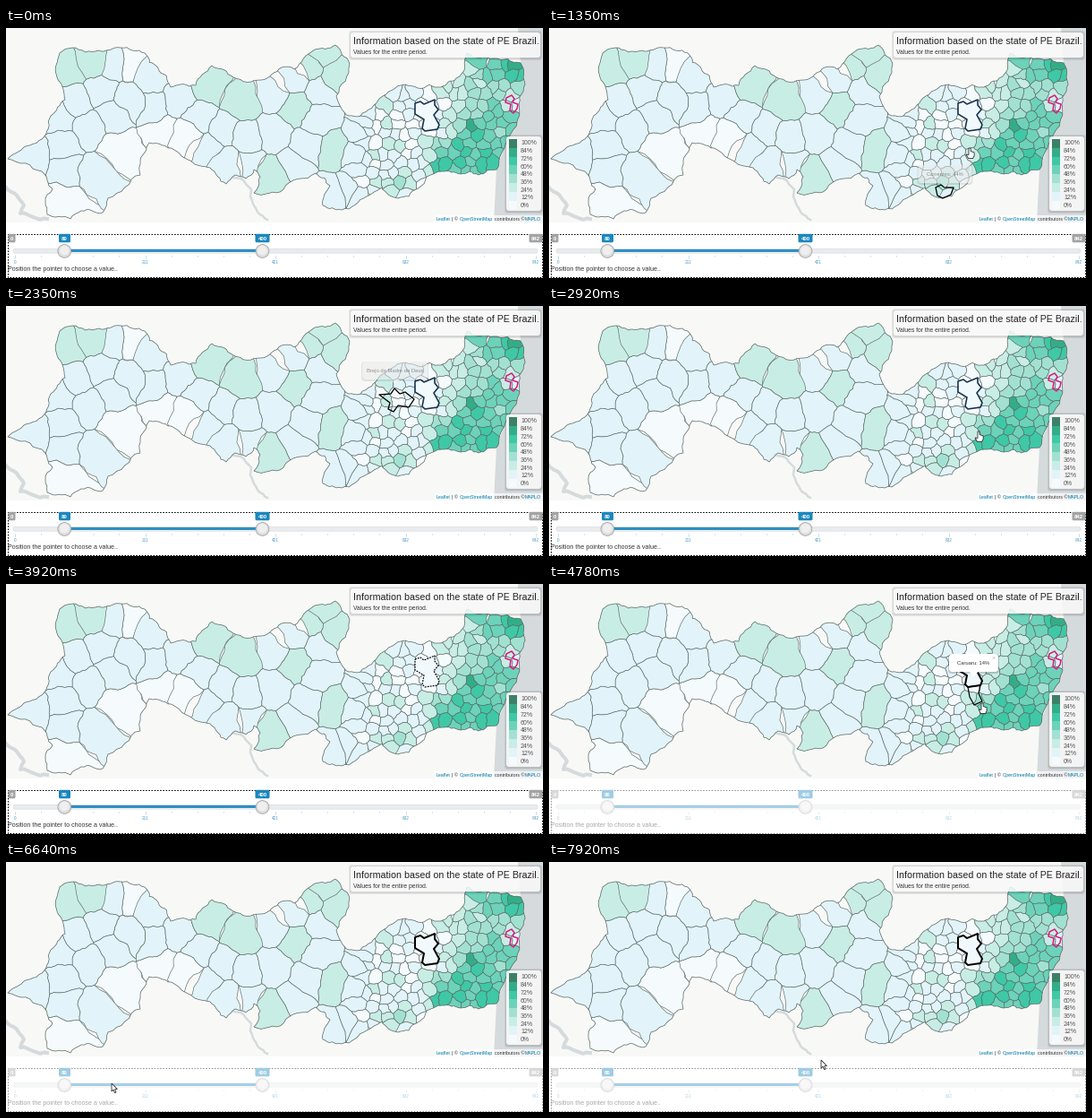
A matplotlib script that plays this animation: 600x279 px, repeating every 8 s.

```python
import math
import random

import numpy as np
import matplotlib.pyplot as plt
from matplotlib.animation import FuncAnimation
from matplotlib.collections import PolyCollection
from matplotlib.patches import Circle, FancyBboxPatch, Polygon, Rectangle
from matplotlib.path import Path

W, H, DPI = 600, 279, 64
LOOP, TICK, STEP = 8000, 40, 140
PT = 72 / DPI
RAMP = ["#f5fbfd", "#e2f4fa", "#c8ede5", "#a2e1d2",
        "#6dd2ba", "#3fc8a6", "#33ad88", "#3d8068"]
WATER, LINK, BLUE, NAVY, EDGE = "#d5dadc", "#0078a8", "#1b87bd", "#16324f", "#56635f"

fig = plt.figure(figsize=(W / DPI, H / DPI), dpi=DPI, facecolor="white")
ax = fig.add_axes([0, 0, 1, 1])
ax.set_xlim(0, W)
ax.set_ylim(H, 0)
ax.axis("off")


# ---- helpers ----
def label(x, y, text, size, color="#333333", z=7, **kw):
    return ax.text(x, y, text, fontsize=size * PT, color=color, zorder=z,
                   family="Liberation Sans", **kw)


def rect(x0, y0, x1, y1, color, z=1, **kw):
    return ax.add_patch(Rectangle((x0, y0), x1 - x0, y1 - y0, fc=color, lw=0, zorder=z, **kw))


def rounded(x0, y0, x1, y1, color, r=2, z=1, **kw):
    kw.setdefault("lw", 0)
    style = f"round,pad=0,rounding_size={r}"
    return ax.add_patch(FancyBboxPatch((x0, y0), x1 - x0, y1 - y0, boxstyle=style,
                                       fc=color, zorder=z, **kw))


def card(x0, y0, x1, y1):
    for grow in (2, 1):
        rounded(x0 - grow, y0 - grow, x1 + grow, y1 + grow + 1, "black", 3, 6, alpha=.07)
    rounded(x0, y0, x1, y1, "white", 3, 6, alpha=.85)


def split(a, b, depth=3):
    """Points from a up to b, bent the same way from either direction."""
    lo, hi = sorted((a, b))
    dx, dy = hi[0] - lo[0], hi[1] - lo[1]
    if depth == 0 or math.hypot(dx, dy) < 5:
        return [a]
    bend = (math.sin(lo[0] * 13 + lo[1] * 78 + hi[0] * 38 + hi[1] * 4) * 4375 % 1 - .5) * .28
    mid = ((lo[0] + hi[0]) / 2 - dy * bend, (lo[1] + hi[1]) / 2 + dx * bend)
    return split(a, mid, depth - 1) + split(mid, b, depth - 1)


def rough(points):
    return [p for a, b in zip(points, points[1:] + points[:1]) for p in split(a, b)]


def half_plane(poly, seed, other):
    """Keep the part of poly that is nearer to seed than to other."""
    nx, ny = other[0] - seed[0], other[1] - seed[1]
    limit = (nx * (other[0] + seed[0]) + ny * (other[1] + seed[1])) / 2
    out = []
    for p, q in zip(poly, poly[1:] + poly[:1]):
        dp, dq = (limit - nx * v[0] - ny * v[1] for v in (p, q))
        if dp >= 0:
            out.append(p)
        if dp * dq < 0:
            s = dp / (dp - dq)
            out.append((p[0] + s * (q[0] - p[0]), p[1] + s * (q[1] - p[1])))
    return out


def cell(seed, seeds, reach=45):
    x, y = seed
    poly = [(x + reach * i, y + reach * j) for i, j in ((-1, -1), (1, -1), (1, 1), (-1, 1))]
    for other in seeds:
        if other != seed and math.dist(seed, other) < 3 * reach:
            poly = half_plane(poly, seed, other)
    return [(round(px, 1), round(py, 1)) for px, py in poly]


# ---- state outline ----
NORTH = [(60, 28), (74, 22), (104, 25), (128, 22), (155, 28), (170, 45), (184, 66), (212, 64),
         (230, 42), (254, 55), (285, 58), (308, 44), (322, 46), (345, 24), (368, 19), (384, 40),
         (369, 76), (383, 98), (396, 98), (418, 78), (446, 63), (460, 67), (486, 66), (503, 56),
         (515, 28), (545, 34)]
COAST = [(575, 39), (578, 55), (573, 85), (558, 130), (548, 158)]
SOUTH = [(528, 164), (518, 160), (508, 163), (487, 160), (470, 166), (450, 188), (438, 190),
         (420, 178), (403, 188), (375, 203), (354, 198), (362, 176), (346, 162), (310, 180),
         (277, 184), (284, 166), (277, 158), (268, 168), (256, 164), (246, 174), (228, 156),
         (188, 136), (160, 128), (150, 148), (150, 164), (114, 190), (108, 206), (84, 204),
         (72, 213), (46, 208), (44, 194), (52, 180), (40, 160), (2, 146)]
WEST = [(14, 138), (40, 124), (50, 98), (66, 80), (57, 55)]
state = Path(rough(NORTH + COAST + SOUTH + WEST))

# ---- base map ----
rect(0, 0, W, 217, "#f8f9f7", 0)
ax.add_patch(Polygon([(572, 0)] + COAST + [(545, 217), (600, 217), (600, 0)], fc=WATER, lw=0, zorder=0))
for river, width in (([(240, 166), (262, 168), (274, 180), (276, 196), (292, 214)], 2.5),
                     ([(0, 178), (20, 198), (16, 207), (46, 213)], 4)):
    bends = [p for a, b in zip(river, river[1:]) for p in split(a, b)] + river[-1:]
    ax.plot(*np.array(bends).T, color=WATER, lw=width * PT, zorder=0)

# Centres of the wide western municipalities by shade
PALE = [(125, 134), (70, 195), (142, 40), (176, 116), (204, 118)]
LIGHT = [(119, 40), (106, 70), (78, 82), (60, 104), (118, 98), (138, 80), (92, 112), (162, 58),
         (164, 86), (192, 80), (215, 102), (28, 138), (64, 130), (68, 160), (100, 164),
         (228, 134), (248, 148), (244, 116), (268, 124), (270, 150), (300, 72), (298, 118),
         (322, 154), (338, 132), (350, 102), (352, 70), (322, 56), (360, 186), (386, 180)]
TEAL = [(73, 45), (97, 38), (228, 64), (264, 82), (324, 88), (340, 42), (358, 30), (368, 50),
        (366, 136), (293, 164)]

# x, y, strength, radius of places with higher or lower values
HOTSPOTS = [(520, 113, 3.4, 8), (490, 147, 3, 12), (532, 151, 2, 16), (566, 46, 2, 11),
            (443, 177, 2.4, 9), (506, 134, 1.2, 18), (551, 95, 1.6, 8), (567, 85, -1.5, 7),
            (471, 98, -2, 12)]


def level(x, y, noise):
    v = .9 + 2.3 * min(max((x - 468) / 70, 0), 1) + noise
    v += sum(s * math.exp(-((x - hx) ** 2 + (y - hy) ** 2) / (2 * r * r))
             for hx, hy, s, r in HOTSPOTS)
    return min(max(round(v), 0), 6)


rng = random.Random(11)
dense = [(x + 6 * (row % 2) + rng.uniform(-4.5, 4.5), y + rng.uniform(-3.5, 3.5))
         for row, y in enumerate(range(30, 200, 11)) for x in range(395, 582, 13)]
dense = [s for s in dense if state.contains_point(s)]
seeds = PALE + LIGHT + TEAL + dense
tones = [0] * len(PALE) + [1] * len(LIGHT) + [2] * len(TEAL)
tones += [level(x, y, rng.uniform(-.85, .85)) for x, y in dense]
areas = PolyCollection([rough(cell(s, seeds)) for s in seeds], fc=[RAMP[t] for t in tones],
                       ec=EDGE, lw=.6 * PT, zorder=2)
ax.add_collection(areas)
areas.set_clip_path(state, ax.transData)
ax.add_patch(Polygon(state.vertices, fill=False, ec=EDGE, lw=.7 * PT, zorder=3))


# ---- highlighted areas ----
def outline(points, color, width, fill="none"):
    return ax.add_patch(Polygon(points, fc=fill, ec=color, lw=width * PT, zorder=4,
                                joinstyle="round"))


outline([(559, 78), (565, 75), (568, 79), (566, 83), (572, 85), (571, 90), (567, 95),
         (563, 92), (564, 85), (558, 83)], "#d9177f", 1.5)
caruaru = outline([(457, 84), (463, 82), (467, 85), (479, 80), (479, 86), (483, 91), (478, 97),
                   (484, 108), (482, 113), (468, 115), (465, 112), (467, 102), (457, 96)],
                  NAVY, 1.6, "#f1f9fc")
neighbour = outline([(468, 115), (482, 113), (480, 122), (484, 131), (475, 135), (470, 126)],
                    "black", 1.2)

# ---- title, legend, attribution ----
card(385, 5, 597, 33)
label(388, 18, "Information based on the state of PE Brazil.", 10.65, "#222222")
label(388, 29.3, "Values for the entire period.", 6.7)

card(559, 121, 598, 204)
for i, tone in enumerate(RAMP[::-1]):
    rect(562, 124 + i * 9.8, 571, 133.8 + i * 9.8, tone, 7)
for i in range(9):
    label(575, 130.5 + i * 8.7, f"{100 if i == 0 else 96 - 12 * i}%", 7, "#555555")

rect(479, 208.5, 600, 217, "white", 6, alpha=.7)
for x, text, color in ((481, "Leaflet", LINK), (497.5, "| ©", "#333333"),
                       (506.5, "OpenStreetMap", LINK), (545.5, "contributors ©", "#333333"),
                       (580, "MAPLO", LINK)):
    label(x, 215, text, 5.27, color)

# ---- slider panel ----
rect(0, 217, W, H, "white", 5)
ax.add_patch(Rectangle((1.5, 229.5), 597, 48.8, fill=False, ec="black", lw=PT,
                       ls=(0, (1.6, 1.6)), zorder=6))


def slider_x(value):
    return 10 + value / 842 * 582


rounded(8, 246.3, 594, 251.2, "#e9ecee", 2, 6, ec="#d3d6d8", lw=.5 * PT)
rect(slider_x(80), 247, slider_x(400), 250.3, "#2d8fc4", 7)
for i in range(21):
    x = slider_x(842 * i / 20)
    ax.plot([x, x], [253.5, 255.2 if i % 5 else 257], color="#a9c6d4", lw=.6 * PT, zorder=6)
for value in (0, 211, 421, 632, 842):
    label(slider_x(value), 263, value, 4.8, "#4a9cc4", ha="center")
for value, x, half, color in ((0, 6.5, 4, "#a3a3a3"), (842, 592, 7.5, "#a3a3a3"),
                              (80, 65.5, 6.5, BLUE), (400, 286.5, 8, BLUE)):
    rounded(x - half, 229.8, x + half, 239.3, color, 1.5, 7)
    label(x, 236.8, value, 6, "white", 8, ha="center", weight="bold")
for value in (80, 400):
    x = slider_x(value)
    ax.add_patch(Circle((x, 249), 7.4, fc="#dcdcdc", ec="#a5a5a5", lw=.8 * PT, zorder=8))
    ax.add_patch(Circle((x, 248.2), 5.4, fc="#efefef", lw=0, zorder=8))
label(2.5, 271, "Position the pointer to choose a value..", 7.08)
veil = rect(0, 228, W, H, "white", 9)


# ---- popups ----
class Popup:
    """A map popup, open from start to end and half faded in its last step."""

    def __init__(self, text, x, y, width, start, end, area=None):
        self.start, self.end = start, end
        x0, x1, y0, y1 = x - width / 2, x + width / 2, y - 25, y - 5
        tail = Polygon([(x - 5, y1), (x + 5, y1), (x, y)], fc="white", lw=0, zorder=11)
        self.parts = [
            (rounded(x0 - 1, y0, x1 + 1, y1 + 2, "black", 4, 10), .18),
            (rounded(x0, y0, x1, y1, "white", 4, 11), 1),
            (ax.add_patch(tail), 1),
            (label(x, y - 12.8, text, 5.9, z=12, ha="center"), 1),
            (label(x1 - 5, y0 + 7, "×", 7, "#b5b5b5", 12, ha="center"), 1),
        ]
        self.area = outline(area, "black", 1.3) if area else None

    def show(self, t):
        is_open = self.start <= t < self.end
        alpha = .5 if t >= self.end - STEP else 1
        for part, strength in self.parts:
            part.set_alpha(alpha * strength)
            part.set_visible(is_open)
        if self.area:
            self.area.set_visible(is_open)


popups = [
    Popup("Correntes: 44%", 442.5, 178, 60, 1210, 1490,
          [(432, 178), (438, 175), (442, 178), (452, 178), (449, 186), (440, 190), (434, 187)]),
    Popup("Gravatá: 31%", 521, 72, 54, 1630, 1910),
    Popup("Brejo da Madre de Deus", 434.5, 87, 73, 2210, 2490,
          [(417, 99), (430, 98), (434, 92), (440, 98), (446, 96), (456, 104), (450, 113),
           (438, 111), (433, 118), (427, 115), (429, 108)]),
    Popup("Passira: 26%", 502, 72, 54, 2630, 2910),
    Popup("Caruaru: 14%", 474.5, 103, 55, 3070, 3920),
    Popup("Caruaru: 14%", 474.5, 103, 55, 4210, 5070),
]

# ---- pointer ----
ARROW = np.array([(0, 0), (0, 9), (2, 7.2), (3.6, 10.6), (5, 10), (3.6, 6.7), (6.4, 6.5)])
HAND = np.array([(-1, 0), (1, 0), (1.2, 3.6), (5, 4.8), (5.2, 8.5), (3.6, 11.5), (-1.5, 11.5),
                 (-4, 7), (-1, 7.5)])
pointer = ax.add_patch(Polygon(ARROW, fc="white", ec="#222222", lw=.8 * PT, zorder=15))

# Start time of each move and the places it visits, one per step
MOVES = [
    (0, [None]),
    (500, [(399, 247), (403, 229), (410, 207)]),
    (1210, [(443, 180), (470, 134), (495, 100), (522, 73), (530, 82), (500, 96), (458, 104)]),
    (2210, [(437, 98), None, (470, 82), (502, 72), (490, 96), (480, 140)]),
    (3070, [(474, 98)]),
    (3920, [None, None, (474, 104), (477, 113), (480, 122)]),
    (4780, [(484, 133), (508, 165), (523, 186)]),
    (5640, [(290, 222), (220, 235), (130, 243), (60, 246), (32, 250), (50, 251), (90, 250),
            (118, 247)]),
    (6780, [(136, 247)]),
    (7070, [(170, 250), (225, 256), (280, 264), (325, 268), (338, 256), (322, 238), (304, 221)]),
]


def update(frame):
    t = frame * TICK + TICK - 10
    start, places = [m for m in MOVES if m[0] <= t][-1]
    place = places[min((t - start) // STEP, len(places) - 1)]
    pointer.set_visible(place is not None)
    if place:
        pointer.set_xy((HAND if place[1] < 200 else ARROW) + place)
    for popup in popups:
        popup.show(t)

    dashed = 3920 <= t < 4210
    caruaru.set_edgecolor(NAVY if t < 3070 else "black")
    caruaru.set_linestyle((0, (1.5, 1)) if dashed else "-")
    caruaru.set_linewidth((1.2 if dashed else 1.6 if t < 3070 else 2) * PT)
    neighbour.set_visible(4780 <= t < 4920)
    veil.set_alpha(.58 * min(max((t - 3920) // STEP, 0), 4) / 4)
    return []


anim = FuncAnimation(fig, update, frames=LOOP // TICK, interval=TICK, repeat=True,
                     repeat_delay=0, init_func=lambda: update(0))
plt.show()
```
